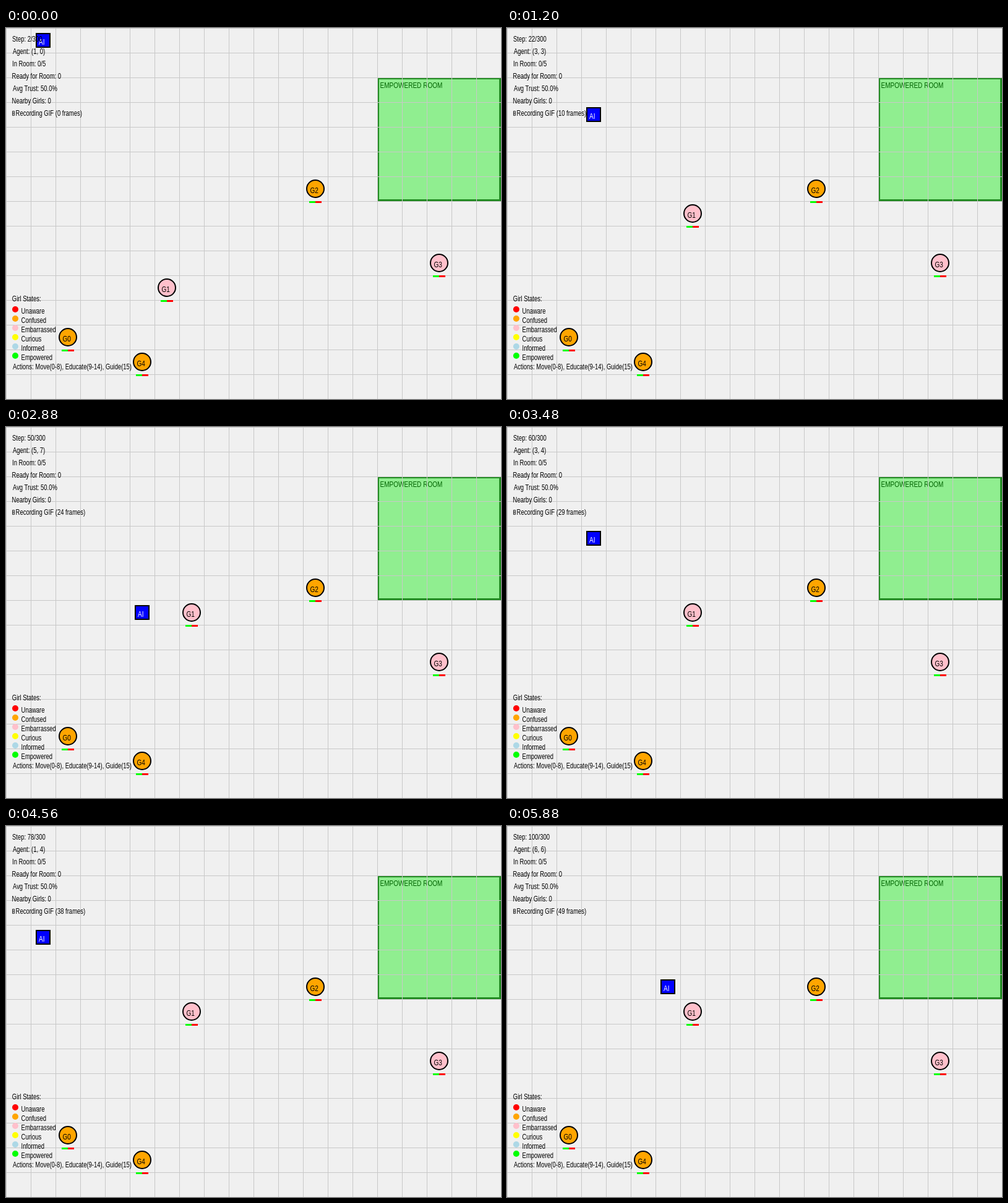
These frames come from a looping animation (800x600 px, 6000 ms). An HTML page:

```html
<!DOCTYPE html>
<html lang="en">
<head>
<meta charset="utf-8">
<title>Grid walk</title>
<style>
  html, body { margin: 0; width: 100%; height: 100%; overflow: hidden; background: #f0f0f0; }
  svg { display: block; width: 800px; height: 600px; }
  text { font: 12px "Liberation Sans Narrow", "Liberation Sans", Arial, sans-serif; white-space: pre; }
  .label { font-size: 12.7px; }
</style>
</head>
<body>
<svg id="stage" viewBox="0 0 800 600"></svg>
<script>
const NS = 'http://www.w3.org/2000/svg';
const stage = document.getElementById('stage');
const CELL = 40, TICK = 120, TICKS = 50;
const CONDENSED = 0.79;

function add(parent, tag, attrs) {
  const el = document.createElementNS(NS, tag);
  for (const key in attrs) el.setAttribute(key, attrs[key]);
  return parent.appendChild(el);
}
const group = () => add(stage, 'g', {});
const rect = (parent, x, y, width, height, fill) =>
  add(parent, 'rect', { x, y, width, height, fill });

function write(parent, x, y, content, fill = '#000', cls = '') {
  const el = add(parent, 'text', {
    transform: `translate(${x} ${y}) scale(${CONDENSED} 1)`, fill, class: cls
  });
  el.textContent = content;
  return el;
}

function place(el, [col, row]) {
  el.setAttribute('transform', `translate(${col * CELL + 20} ${row * CELL + 20})`);
}

// Room, with the grid on top of it
rect(stage, 600, 80, 200, 200, '#228b22');
rect(stage, 603, 83, 194, 194, '#90ee90');
write(stage, 604.5, 97, 'EMPOWERED ROOM', '#006400', 'label');
for (let x = 0; x < 800; x += CELL) rect(stage, x, 0, 1, 600, '#c8c8c8');
for (let y = 0; y < 600; y += CELL) rect(stage, 0, y, 800, 1, '#c8c8c8');

// Girls
const girls = [
  [2, 12, 'orange'], [6, 10, 'pink'], [12, 6, 'orange'], [17, 9, 'pink'], [5, 13, 'orange']
].map(([col, row, fill], i) => {
  const g = group();
  add(g, 'circle', { r: 14, fill, stroke: '#000', 'stroke-width': 2 });
  write(g, -8.5, 7, 'G' + i, '#000', 'label');
  rect(g, -10, 20, 10, 3, '#0f0');
  rect(g, 0, 20, 10, 3, '#f00');
  place(g, [col, row]);
  return g;
});

// Agent
const agent = group();
rect(agent, -12, -12, 24, 24, '#000');
rect(agent, -10, -10, 20, 20, '#00f');
write(agent, -7, 7, 'AI', '#fff', 'label');

// Status lines
const step = write(stage, 10, 22, '');
const pos = write(stage, 11, 42, '');
write(stage, 10, 62, 'In Room: 0/5');
write(stage, 9.6, 82, 'Ready for Room: 0');
write(stage, 11, 102, 'Avg Trust: 50.0%');
write(stage, 9.6, 122, 'Nearby Girls: 0');
add(stage, 'path', { d: 'M10.5 134.5h3v7h-3zM12 136v4', fill: 'none', stroke: '#000', 'stroke-width': 0.8 });
const record = write(stage, 15.6, 142, '');

// Legend
write(stage, 9.8, 442, 'Girl States:');
[
  ['Unaware', 'red'], ['Confused', 'orange'], ['Embarrassed', 'pink'],
  ['Curious', 'yellow'], ['Informed', 'lightblue'], ['Empowered', 'lime']
].forEach(([name, fill], i) => {
  add(stage, 'circle', { cx: 15, cy: 455 + 15 * i, r: 5, fill });
  write(stage, 24.6, 462 + 15 * i, name);
});
write(stage, 11, 552, 'Actions: Move(0-8), Educate(9-14), Guide(15)');

// Waypoints: tick, column, row
const agentPath = [
  [0, 1, 0], [2, 0, 0], [4, 1, 1], [7, 0, 0], [10, 3, 3], [14, 0, 5], [16, 1, 6],
  [20, 3, 8], [24, 5, 7], [27, 4, 5], [30, 2, 4], [33, 0, 2], [38, 1, 4],
  [42, 0, 6], [43, 0, 6], [49, 6, 6]
];
const girlPath = [[0, 6, 10], [3, 6, 9], [6, 7, 8], [9, 7, 7], [49, 7, 7]];

function cellAt(path, n) {
  const i = Math.max(1, path.findIndex(p => p[0] >= n));
  const [t0, x0, y0] = path[i - 1], [t1, x1, y1] = path[i];
  const k = (n - t0) / (t1 - t0);
  return [Math.round(x0 + (x1 - x0) * k), Math.round(y0 + (y1 - y0) * k)];
}

let shown = -1;
function draw(n) {
  const cell = cellAt(agentPath, n);
  place(agent, cell);
  place(girls[1], cellAt(girlPath, n));
  step.textContent = `Step: ${2 * n + 2}/300`;
  pos.textContent = `Agent: (${cell.join(', ')})`;
  record.textContent = `Recording GIF (${n} frames)`;
  shown = n;
}

function loop() {
  const n = Math.floor(performance.now() / TICK) % TICKS;
  if (n !== shown) draw(n);
  requestAnimationFrame(loop);
}
loop();
</script>
</body>
</html>
```
